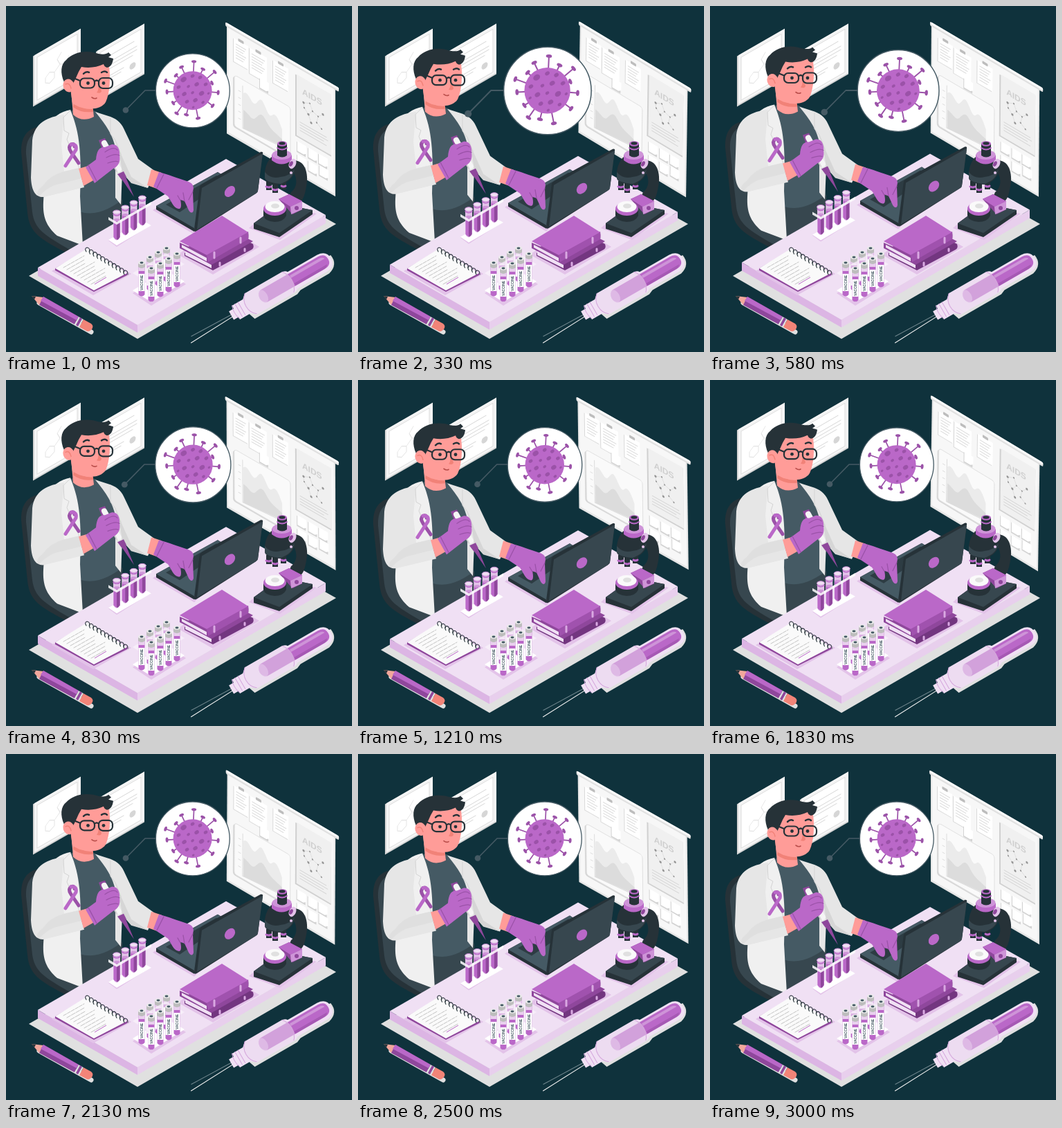
Recreate the animation shown at these times as an HTML page. Size 500 by 500 pixels, loop 3040 ms.

```html
<!DOCTYPE html>
<html lang="en">
<head>
<meta charset="utf-8">
<title>Lab research</title>
<style>
html, body { margin: 0; height: 100%; overflow: hidden; background: #0f323c; }
svg { display: block; width: 100vw; height: 100vh; }
text { font-family: "Liberation Sans", Arial, sans-serif; font-weight: bold; }
.p { fill: #ba68c8; } .pd { fill: #8f479c; } .pl { fill: #e3c3e9; } .px { fill: #f0e0f4; }
.k { fill: #263238; } .k2 { fill: #37474f; } .k3 { fill: #455a64; }
.w { fill: #fafafa; } .g { fill: #e0e0e0; } .skin { fill: #ff9c98; }
.line { fill: none; stroke-linecap: round; stroke-linejoin: round; }
</style>
</head>
<body>
<svg viewBox="0 0 500 500">
  <!-- framed certificates -->
  <g transform="matrix(1 -.577 0 1 39 72.500)">
    <rect fill="#d6d6d6" width="69" height="73"/><rect x="2" width="67" height="71" fill="#f5f5f5"/>
    <rect x="6" y="5" width="58" height="62" fill="#fff" stroke="#dcdcdc"/>
    <path class="line" stroke="#e4e4e4" d="M18 42l6-5 7 4v8l-7 4-6-4zM31 41l8-7 7 4 6-9M39 34l-4-9 6-7M46 38l2 10"/>
  </g>
  <g transform="matrix(1 -.577 0 1 130 66)">
    <rect fill="#d6d6d6" width="70" height="73"/><rect x="2" width="68" height="71" fill="#f5f5f5"/>
    <rect x="6" y="5" width="59" height="62" fill="#fff" stroke="#dcdcdc"/>
    <path class="line" stroke="#d6d6d6" d="M21 17h34M17 26h42M17 31h42M17 36h36M20 46h20M20 50h16"/>
    <circle cx="53" cy="51" r="4.500" fill="#d6d6d6"/>
  </g>

  <!-- wall board -->
  <g id="board">
    <g transform="matrix(1 .58 0 1 317 23)">
      <rect x="2" y="4" width="157" height="156" fill="#e6e6e6"/>
      <rect x="4" y="4" width="153" height="153" fill="#f7f7f7"/>
      <rect width="164" height="6" rx="2" fill="#e0e0e0"/><rect x="1" width="163" height="3.500" rx="2" fill="#fafafa"/>
      <g id="notes"></g>
      <rect x="11" y="71" width="83" height="74" rx="4" fill="#d6d6d6"/>
      <rect x="13" y="69" width="81" height="74" rx="4" fill="#fafafa" stroke="#e0e0e0"/>
      <path fill="#ebebeb" d="M26 139V88C32 80 36 93 41 94S49 76 55 85 63 102 68 95 78 98 82 108V132Z"/>
      <path fill="#dcdcdc" d="M26 139V112C35 113 38 122 44 113S53 100 59 109 72 118 82 122V132Z"/>
      <path class="line" stroke="#dcdcdc" d="M25 78V139L83 133M19 88h3M19 98h3M19 108h3M19 118h3M19 128h3"/>
      <rect x="101" y="17" width="52" height="89" fill="#d0d0d0"/>
      <rect x="103" y="16" width="50" height="88" fill="#f0f0f0"/>
      <text x="111" y="40" font-size="12" fill="#cfcfcf">AIDS</text>
      <path class="line" stroke="#dcdcdc" stroke-width=".7" d="M113 51l9-4 4 9-6 8-6-6zM126 56l8 3 7-7M134 59l-2 10 7 5M120 64l4 10"/>
      <g id="atoms"></g>
      <path class="line" stroke="#d3d3d3" d="M108 82h38M108 86h40M108 90h34M108 94h38"/>
    </g>
  </g>

  <path class="g" d="M33 390L318 226 477 315 190 481Z"/>

  <g id="floating">
    <!-- chair -->
    <path class="k" d="M49 174C30 177 21 190 22 212L31 299C34 328 48 336 88 357L118 338 70 190Z"/>
    <path class="k2" d="M50 181C36 183 28 194 29 214L38 298C41 322 55 331 92 352L118 338 70 190Z"/>

    <!-- torso -->
    <path class="k3" d="M94 152C105 145 120 148 131 153L160 170 169 307 108 343 84 260Z"/>
    <path class="k2" d="M106 297C130 305 152 292 168 280V308L110 342Z"/>
    <path fill="#e6e6e6" d="M129 153L151 160C162 164 168 171 172 181L191 221 216 239 205 263 181 255 168 241 166 287 158 277V205C155 188 145 172 129 153Z"/>
    <path fill="#d6d6d6" d="M168 241L163 207 181 247 205 263 181 256Z"/>
    <path fill="#f0f0f0" d="M93 150C79 153 66 160 60 176L54 283C53 305 58 318 74 332L111 346 107 275C109 225 108 189 96 158Z"/>
    <path fill="#e6e6e6" d="M84 157C60 160 41 169 38 194L36 248C37 268 43 277 55 276L113 262 105 234 84 239 80 200Z"/>
    <path fill="#d9d9d9" d="M53 260Q64 244 84 239L106 234 110 249 70 259Q58 264 48 275Q40 270 53 260Z" opacity=".5"/>
    <path class="line" stroke="#d3d3d3" d="M93 151L83 161 84 180 91 184 88 193 108 239M151 162V185L158 194 166 214"/>
    <path class="line" stroke="#9b52a8" stroke-width="5" stroke-linecap="butt" d="M99 203Q99 198 94 200Q89 204 94 211L105 227"/>
    <path class="line" stroke="#ba68c8" stroke-width="5" stroke-linecap="butt" d="M86 231L101 208Q103 199 94 200"/>

    <!-- head -->
    <path class="skin" d="M94 122L97 157Q110 169 127 160L125 143Z"/>
    <path fill="#f18278" d="M98 139Q109 150 126 149V153Q108 155 97 146Z"/>
    <path class="skin" d="M98 84L148 82C152 103 150 126 144 139 137 150 121 150 106 146L96 141 93 119Z"/>
    <path class="k" d="M84 110C78 97 79 84 87 78 95 69 110 64 126 67 136 70 144 71 148 67L152 71 148 74 155 76C154 84 151 88 146 89Q142 88 141 84Q126 91 109 88L105 95 101 104 97 112Z"/>
    <ellipse class="skin" cx="90.500" cy="115" rx="8" ry="9.500" transform="rotate(-15 90.500 115)"/>
    <path class="line" stroke="#f18278" stroke-width="1.500" d="M86 113Q92 110 94 119"/>
    <path fill="#f18278" d="M133 109L138 123Q137 127 131 125Q135 121 133 109Z"/>
    <g class="line" stroke="#263238">
      <rect x="107" y="104.500" width="21" height="14" rx="6" stroke-width="2.200"/>
      <rect x="134" y="104" width="20" height="15" rx="6" stroke-width="2.200"/>
      <path stroke-width="2.200" d="M128 109Q131 106 134 109M107 108L95 103"/>
      <path stroke-width="2.500" d="M112 98Q116 94 120 96M138 96Q143 93 146 96"/>
      <path stroke="#b94e4b" stroke-width="1.600" d="M124 132Q128 135 131 133"/>
    </g>
    <circle class="k" cx="118.500" cy="111.500" r="2.400"/><circle class="k" cx="141" cy="111.500" r="2.400"/>

    <!-- desk -->
    <path class="px" d="M46 378L318 221 462 302 190 461Z"/>
    <path fill="#dcb5e4" d="M46 378L190 461V472L46 390Z"/>
    <path fill="#e8cfed" d="M190 461L462 302V314L190 472Z"/>
    <path class="pl" d="M148 339L182 320 210 316 160 348ZM212 295L305 240 340 262 272 330Z"/>

    <g id="tubes"></g>

    <!-- laptop -->
    <path class="k" d="M217 289L306 240 331 256 272 321V326L217 294Z"/>
    <path class="k3" d="M217 289L306 240 331 256 272 321Z"/>
    <path class="k" d="M231 287L304 245 317 253 251 298Z" opacity=".75"/>
    <path class="k" d="M280 261Q281 259 284 257L368 211Q372 210 371 214L364 267Q364 269 361 271L276 325Q271 328 272 322Z"/>
    <path class="k2" d="M283 263L371 213 364 267Q364 269 361 271L276 323Z"/>
    <ellipse class="p" cx="323.500" cy="268" rx="9" ry="6.500" transform="rotate(-48 323.500 268)"/>

    <!-- right arm -->
    <path class="skin" d="M210 236L225 241 218 264 204 259Z"/>
    <path class="p" d="M221 240C236 244 245 248 264 254 271 257 272 262 270 268L271 295C270 301 265 299 263 293L258 282 252 280C254 289 253 294 249 293 241 291 240 283 234 275L213 261Z"/>
    <path class="line" stroke="#9b52a8" stroke-width="1.300" d="M228 243L218 263M258 282L256 270M252 281L248 274M264 280L270 268"/>

    <!-- left hand and pipette -->
    <path class="pd" d="M134 194L143 191 148 202 139 207Z"/>
    <path class="line" stroke="#f5f5f5" stroke-width="8" d="M142 198L163 236"/>
    <path class="line" stroke="#d2d2d2" stroke-width="2" d="M155 230L160 239"/>
    <path class="pd" d="M167 250L173 247 185 276Z"/>
    <path class="pd" d="M161 243L170 239 174 247 167 251Z"/>
    <path class="skin" d="M105 235L119 231 128 251 112 260Z"/>
    <path class="p" d="M115 233L130 222C131 209 135 203 143 204L153 200C162 199 165 209 164 216 166 225 162 232 155 235L128 256Z"/>
    <path class="line" stroke="#9b52a8" stroke-width="1.300" d="M119 230L131 253M143 211Q156 202 161 208M145 219Q158 212 164 216M147 227Q158 223 162 225"/>
  </g>

  <!-- notebook -->
  <path class="pl" d="M66 383L121 352 181 387 126 418Z"/>
  <path class="pd" d="M71 379L119 351 175 386V389L127 413 71 382Z"/>
  <path class="w" d="M71 379L118 350 175 386 127 411Z"/>
  <g id="pad"></g>

  <!-- books -->
  <path class="pl" d="M248 359L315 318 366 348 299 388Z"/>
  <path fill="#733680" d="M258 357L317 324 357 344Q359 350 355 352L299 382 258 361Z"/>
  <path class="px" d="M259 360L297 379V374L259 353Z"/>
  <path class="pd" d="M256 352L316 319 357 340 297 374Z"/>
  <path class="pd" d="M290 359L350 326Q352 338 348 339L292 371 251 350V342Z"/>
  <path class="px" d="M254 345L290 364V369L254 349Z"/>
  <path class="p" d="M251 340L312 303 350 327 290 360Z"/>
  <path fill="#a957b7" d="M290 360L350 327V337L292 370Z" opacity=".7"/>
  <path class="line" stroke="#d9a8e2" stroke-width="3" d="M301 356V364M339 335V342M309 371V375M345 351V354"/>

  <!-- microscope -->
  <path class="pl" d="M351 321L390 287 449 300 396 338Z"/>
  <path class="k" d="M358 314L397 286 443 295V301L395 334 358 322Z"/>
  <path class="k2" d="M358 314L397 286 443 295 395 328Z"/>
  <path class="k" d="M411 224C433 219 439 244 433 266 430 282 423 290 407 281L412 269C423 261 421 244 411 235Z"/>
  <path class="pd" d="M394 279L409 272 428 282V294L414 301Z"/>
  <path class="p" d="M394 279L409 272 428 282 411 290Z"/>
  <path fill="#ce94d8" d="M411 290L428 282V294L412 301Z"/><circle class="pd" cx="420" cy="292" r="3"/>
  <path class="k" d="M372 294H405V303Q401 312 388 312Q374 311 372 303Z"/>
  <ellipse class="p" cx="388.500" cy="293" rx="16.500" ry="10"/><ellipse class="w" cx="388.500" cy="290" rx="14" ry="8"/>
  <ellipse class="g" cx="389" cy="289" rx="6" ry="3.500"/>
  <path class="k" d="M376 253H384V266H376ZM385 256H393V270H385ZM397 253H405V265H397Z"/>
  <path class="line" stroke="#ba68c8" stroke-width="3" d="M376 261Q380 263 383 261M386 265Q389 267 392 265M398 260Q401 262 404 260"/>
  <path class="k" d="M374 239Q376 224 386 216L410 217 418 235Q416 252 397 258Q376 257 374 249Z"/>
  <path class="k2" d="M374 240Q383 251 397 247Q412 245 417 236Q414 251 397 257Q375 255 374 248Z"/>
  <path class="p" d="M384 215Q398 203 413 216V223Q398 234 384 223Z"/>
  <ellipse fill="#ce94d8" cx="398.500" cy="215" rx="14" ry="7"/>
  <path class="k" d="M392 199H406V216Q399 221 392 216Z"/>
  <ellipse class="p" cx="399" cy="199" rx="7" ry="3.800"/><ellipse class="k" cx="399" cy="198.500" rx="4.500" ry="2.200"/>
  <path class="line" stroke="#ba68c8" stroke-width="2" d="M392 205Q399 210 406 205"/>
  <ellipse class="pl" cx="414" cy="228" rx="5" ry="7.500" transform="rotate(25 414 228)"/>
  <ellipse class="pd" cx="412" cy="228" rx="2.500" ry="4" transform="rotate(25 412 228)"/>
  <circle class="pl" cx="412" cy="241" r="2"/>

  <g id="vials"></g>

  <!-- pencil -->
  <path class="line" stroke="#e0e0e0" stroke-width="7" d="M48 429L123 471"/>
  <path fill="#f2a79c" d="M37 419L54 421 48 432Z"/><path class="k" d="M37 419L43 420 41 424Z"/>
  <path class="pd" d="M54 420L105 449 99 460 48 432Z"/><path class="p" d="M54 420L105 449 102 454 50 426Z"/>
  <path class="g" d="M105 449L112 453 106 464 99 460Z"/><path class="pd" d="M107 450L110 452 104 463 101 461Z"/>
  <path fill="#f28478" d="M112 453L123 459Q128 463 123 468Q120 471 117 470L106 464Z"/>

  <!-- syringe: drawn along its axis -->
  <g transform="translate(326 446) rotate(-30)">
    <path class="line" stroke="#6f858c" d="M-66-2L4 0"/>
    <path class="line" stroke="#f0f0f0" stroke-width="1.100" d="M-71 6L6 3"/>
    <path fill="#e0e0e0" d="M0 4H20L26 22H97L104 19H152Q170 14 167-3L30-10Z"/>
    <path class="px" d="M-1-6H7V-11H25L32-17H92Q99-17 101-13H150Q165-12 165 1 165 15 150 15H101Q99 18 92 18H32L25 12H7V8H-1Z"/>
    <path class="p" d="M54-10H150Q161-10 161 0 161 10 150 10H54Q47 7 47 0 47-7 54-10Z"/>
    <path fill="#ce94d8" d="M101-7H149Q155-7 157-3H101Z"/>
    <path class="pd" d="M101 6H156Q153 10 149 10H101Z" opacity=".45"/>
    <path fill="#ecdaf0" fill-opacity=".5" d="M32-17H93Q101-14 101 0 101 14 93 18H32Q23 10 23 0 23-10 32-17Z"/>
    <ellipse class="pl" cx="53" rx="6" ry="10" opacity=".7"/>
    <path class="line" stroke="#d4a5dc" d="M32-17Q24-10 24 0 24 11 32 17M7-11Q3 0 7 10M12-11V10M17-11V10M94-17Q100-10 100 0 100 11 94 17"/>
  </g>

  <!-- virus callout -->
  <g id="callout">
    <path class="line" stroke="#455a64" stroke-width="1.600" d="M173 150.500L201 122H217"/>
    <circle class="k3" cx="173" cy="150.500" r="4.300"/>
    <circle cx="269.800" cy="122.400" r="53.400" fill="#fff" stroke="#455a64" stroke-width="1.300"/>
    <g id="virus" transform="translate(-.4 -.8)"></g>
  </g>
</svg>
<script>
const $ = id => document.getElementById(id);
const fill = (id, list, draw) => { $(id).innerHTML += list.map(draw).join(''); };
const range = n => [...Array(n).keys()];

// Board: pinned sheets, sticky notes, molecule
fill('notes', [[12, 16, 21, 34], [35, 17, 25, 37], [69, 15, 22, 33]], ([x, y, w, h]) =>
  `<rect x="${x - 1}" y="${y + 1}" width="${w}" height="${h}" fill="#d9d9d9"/>
   <rect x="${x}" y="${y}" width="${w}" height="${h}" fill="#fff"/>
   <rect x="${x + w / 2 - 4}" y="${y - 3}" width="8" height="4" rx="1" fill="#bdbdbd"/>` +
  range(6).map(i => `<path stroke="#d6d6d6" d="M${x + 3} ${y + 7 + i * 4}h${w - 6 - i % 3 * 2}"/>`).join(''));
fill('notes', [[50, 52], [104, 112], [120, 112], [135, 112], [104, 131], [120, 131], [136, 128]], ([x, y]) =>
  `<path fill="#d3d3d3" d="M${x - 1} ${y + 1}h13v15h-13z"/><path fill="#fff" d="M${x} ${y}h13v11l-4 3h-9z"/>`);
fill('atoms', [[113, 51], [122, 47], [126, 56], [120, 64], [114, 58], [134, 59], [141, 52], [132, 69], [139, 74], [124, 74]],
  ([x, y], i) => `<circle cx="${x}" cy="${y}" r="${i % 3 ? 1.1 : 1.6}" fill="#949494"/>`);

// Test tubes in their rack
$('tubes').innerHTML = '<path fill="#fff" d="M148 338l49-28 13 7-50 29z"/>';
fill('tubes', range(4), i => {
  const x = 160 + i * 12.3, y = 298 - i * 7;
  return `<path fill="#e3c3e9" d="M${x - 5} ${y}h10v36q-5 9-10 0z"/>
    <path class="p" d="M${x - 4.5} ${y + 11}h9v25q-4.500 7-9 0z"/>
    <path class="pd" d="M${x} ${y + 12}h4.500v24q-1 3-4.500 4z"/>
    <ellipse fill="#ce94d8" cx="${x}" cy="${y + 11}" rx="4.500" ry="2"/>
    <path class="line" stroke="#ba68c8" stroke-width="1.500" d="M${x - 5} ${y + 3}q5 4 10 0"/>
    <ellipse cx="${x}" cy="${y}" rx="5.500" ry="3" fill="#f0e0f4" stroke="#c88bd3"/>`;
});
$('tubes').innerHTML += '<path fill="#fff" d="M148 305l12 7 50-29v4l-50 29-12-7z" opacity=".85"/>';

// Notebook writing and spiral
fill('pad', range(9), i => {
  const x = 83 + i * 5, y = 378 + i * 3;
  return `<path class="line" stroke="#c4c4c4" stroke-dasharray="${5 + i % 3} 1.500" d="M${x} ${y}l${30 - i % 3 * 4} ${-17 + i % 3 * 2.3}"/>`;
});
$('pad').innerHTML += '<path stroke="#ba68c8" d="M128 402l17-10"/>';
fill('pad', range(11), i =>
  `<path class="line" stroke="#263238" stroke-width="1.100" d="M${116 + i * 5.5} ${355 + i * 3.3}q-3-5 1-6 4 0 4 6"/>`);

// Vaccine vials
$('vials').innerHTML = '<path class="pl" d="M183 415l50-31 27 18-50 31z"/><path fill="#fff" d="M183 411l48-29 27 16-48 30z"/>';
const vial = ([x, y]) =>
  `<path class="p" d="M${x - 4.5} ${y + 6}h9v40q-4.500 5-9 0z"/>
   <path fill="#e9d0ee" d="M${x - 4.5} ${y + 6}h9v6h-9z"/>
   <path fill="#fff" d="M${x - 4.5} ${y + 16}h9v25h-9z"/>
   <text transform="translate(${x + 2} ${y + 40})rotate(-90)" font-size="5" fill="#455a64">VACCINE</text>
   <path fill="#bdbdbd" d="M${x - 5} ${y}h10v6q-5 4-10 0z"/>
   <ellipse cx="${x}" cy="${y}" rx="5" ry="2.800" fill="#ebebeb"/><ellipse class="k3" cx="${x}" cy="${y}" rx="2.500" ry="1.400"/>`;
fill('vials', [[232, 350], [220, 356], [208, 363]], vial);
$('vials').innerHTML += '<path fill="#fff" d="M183 386l48-29 27 16-48 30z" opacity=".45"/>';
fill('vials', [[247, 358], [235, 365], [196, 371], [223, 372], [210, 379]], vial);

// Virus: spikes, body, spots
const tips = [[272, 81], [285, 92], [302, 96], [307, 126], [299, 145], [298, 112], [278, 163],
  [261, 158], [247, 156], [242, 141], [233, 125], [231, 109], [246, 101], [254, 89]];
fill('virus', tips, ([x, y]) => {
  const turn = Math.atan2(y - 123, x - 270) * 180 / Math.PI;
  return `<path class="line" stroke="#9b52a8" stroke-width="1.700" d="M270 123L${x} ${y}"/>
    <ellipse fill="#9b52a8" cx="${x}" cy="${y}" rx="2" ry="3.600" transform="rotate(${turn} ${x} ${y})"/>`;
});
$('virus').innerHTML += '<circle class="p" cx="270" cy="123" r="28"/>';
const spots = [[257, 107, 4.5], [270, 102, 3], [281, 104, 3], [289, 114, 3], [276, 114, 3.5], [264, 117, 2.5], [250, 118, 3],
  [258, 128, 3.5], [270, 126, 2.5], [283, 127, 4], [293, 127, 2], [249, 132, 2], [262, 139, 3], [274, 137, 3.5], [285, 140, 2.5], [271, 147, 2]];
fill('virus', spots, ([x, y, r]) =>
  `<ellipse cx="${x}" cy="${y}" rx="${r}" ry="${r * .75}" fill="#9b52a8" transform="rotate(-35 ${x} ${y})"/>`);

// Piecewise linear value at p from [position, value] stops
function track(p, stops) {
  const i = Math.max(1, stops.findIndex(s => s[0] >= p));
  const [a, u] = stops[i - 1], [b, v] = stops[i];
  return u + (v - u) * (p - a) / (b - a);
}
const beat = [[0, 1], [.1, 1.195], [.3, 1], [.4, 1], [.5, 1.195], [.6, 1], [1, 1]];
const sway = [[0, 0], [.25, 1], [.75, -1], [1, 0]];
const lift = [[0, 0], [.5, -9.7], [1, 0]];

function frame() {
  const t = Math.min(performance.now() % 3040, 3000);
  const half = t % 1500 / 1500;
  $('callout').setAttribute('transform', `translate(248 122) scale(${track(t / 3000, beat)}) translate(-248 -122)`);
  $('board').setAttribute('transform', `rotate(${track(half, sway)} 399 147)`);
  $('floating').setAttribute('transform', `translate(0 ${track(half, lift)})`);
  requestAnimationFrame(frame);
}
frame();
</script>
</body>
</html>
```
